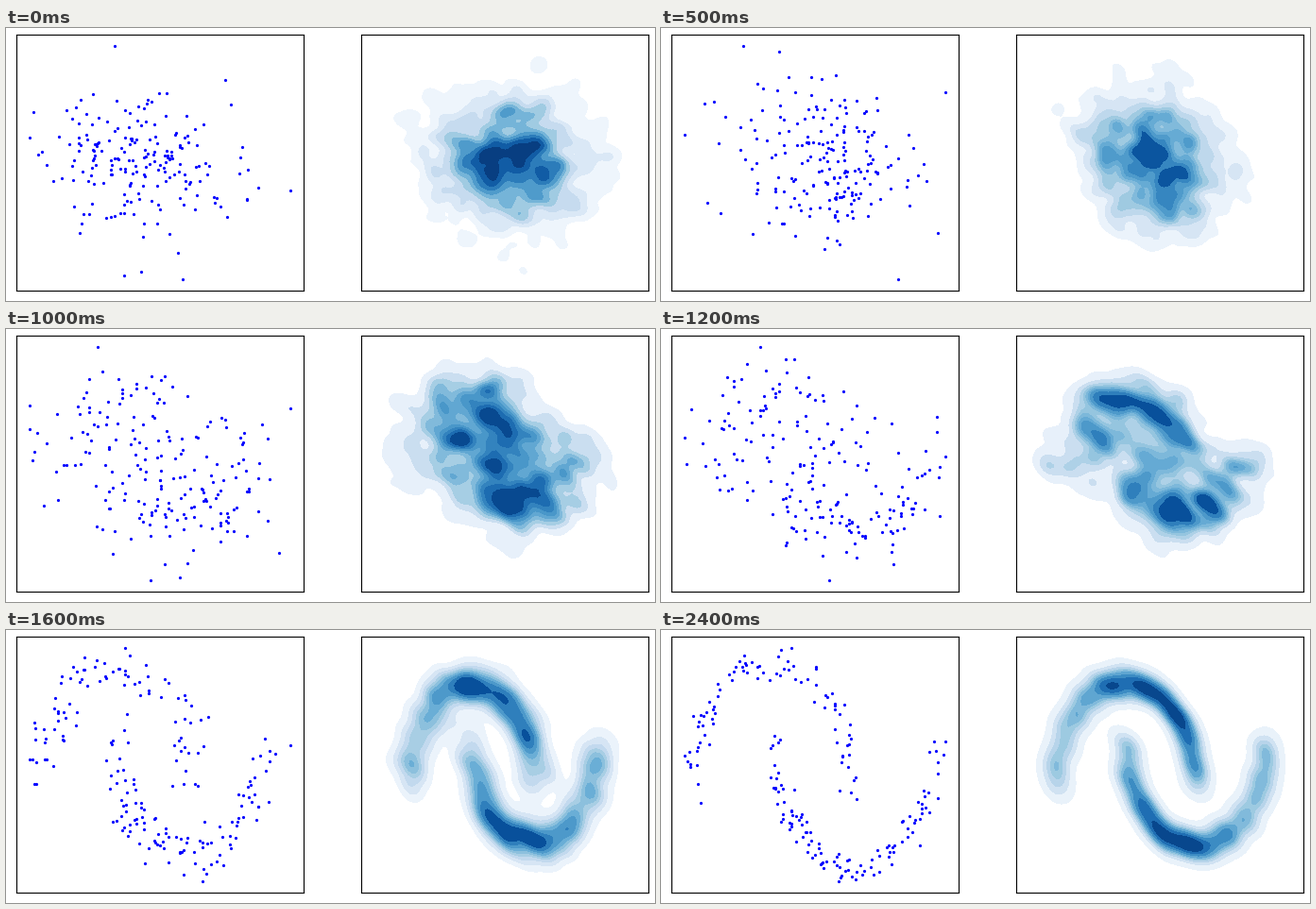
A matplotlib script that plays this animation: 687x289 px, repeating every 2.5 s.

```python
import numpy as np
import matplotlib.pyplot as plt
from matplotlib.animation import FuncAnimation

W, H, DPI = 687, 289, 100
FRAMES, STEP = 25, 100
N, N_DOTS, GRID = 1000, 200, 110
rng = np.random.default_rng(5)


def moon_angles(n, degrees, weights):
    """Angles along a half circle, spread by a piecewise linear density."""
    t = np.linspace(0, 180, 361)
    cdf = np.cumsum(np.interp(t, degrees, weights))
    u = (np.arange(n) + rng.random(n)) / n
    return np.radians(np.interp(u, cdf / cdf[-1], t))


def two_moons(n):
    a = moon_angles(n // 2, [0, 25, 95, 120, 150, 180],
                    [.8, 1, 1, .85, .75, .75])
    b = moon_angles(n // 2, [0, 20, 50, 95, 130, 165, 180],
                    [.75, .85, 1, 1, .75, .8, .75])
    x = np.r_[np.cos(a), 1 - np.cos(b)]
    y = np.r_[np.sin(a), .5 - np.sin(b)]
    pts = np.c_[x, y] + rng.normal(0, .065, (n, 2))
    pts = rng.permutation(pts)
    return (pts - [.5, .25]) / [.87, .49]


def diffuse(clean):
    """Forward diffusion from the last frame back to the first."""
    k = np.arange(FRAMES)
    s = np.cos(np.pi / 2 * (k + 2.5) / 27) ** 2.5
    a = np.sqrt(1 - s ** 2)
    eps = rng.normal(size=clean.shape)
    path = [a[-1] * clean + s[-1] * eps]
    for i in range(FRAMES - 2, -1, -1):
        rho = a[i] * s[i + 1] / (a[i + 1] * s[i])
        eps = rho * eps + np.sqrt(1 - rho ** 2) * rng.normal(size=clean.shape)
        path.append(a[i] * clean + s[i] * eps)
    return path[::-1]


def density(pts):
    """Gaussian kernel density on a grid reaching three bandwidths out."""
    cov = np.cov(pts.T) * (.5 * N ** (-1 / 6)) ** 2
    bw = np.sqrt(np.diag(cov))
    lo, hi = pts.min(0) - 3 * bw, pts.max(0) + 3 * bw
    gx, gy = (np.linspace(lo[i], hi[i], GRID) for i in (0, 1))
    inv = np.linalg.inv(cov).astype(np.float32)
    dx = (gx[:, None] - pts[:, 0]).astype(np.float32)
    dy = (gy[:, None] - pts[:, 1]).astype(np.float32)
    qx, qy = -.5 * inv[0, 0] * dx ** 2, -.5 * inv[1, 1] * dy ** 2
    cross = -inv[0, 1] * dx
    z = np.array([np.exp(qx + qy[j] + cross * dy[j]).sum(1)
                  for j in range(GRID)], dtype=float)
    return gx, gy, z


def mass_levels(z):
    """Density values that enclose evenly spaced shares of the mass."""
    v = np.sort(z.ravel())[::-1]
    share = np.cumsum(v) / v.sum()
    idx = np.searchsorted(share, 1 - np.linspace(.05, 1, 10))
    return v[np.clip(idx, 0, v.size - 1)]


def panel(left):
    ax = fig.add_axes([left / W, (H - 278) / H, 304 / W, 271 / H])
    ax.set(xticks=[], yticks=[])
    return ax


fig = plt.figure(figsize=(W / DPI, H / DPI), dpi=DPI, facecolor="white")
ax_dots, ax_kde = panel(11), panel(376)
dots, = ax_dots.plot([], [], "o", color="blue", ms=2.3, mew=0)
path = diffuse(two_moons(N))
fill = None


def draw(k):
    global fill
    pts = path[k]
    shown = pts[:N_DOTS]
    dots.set_data(shown[:, 0], shown[:, 1])
    lo, hi = shown.min(0), shown.max(0)
    pad = .05 * (hi - lo)
    ax_dots.set_xlim(lo[0] - pad[0], hi[0] + pad[0])
    ax_dots.set_ylim(lo[1] - pad[1], hi[1] + pad[1])

    if fill is not None:
        fill.remove()
    gx, gy, z = density(pts)
    fill = ax_kde.contourf(gx, gy, z, levels=mass_levels(z), cmap="Blues")
    ax_kde.set_xlim(gx[0], gx[-1])
    ax_kde.set_ylim(gy[0], gy[-1])
    return dots,


anim = FuncAnimation(fig, draw, frames=FRAMES, interval=STEP, repeat=True,
                     repeat_delay=0, blit=False)
plt.show()
```
